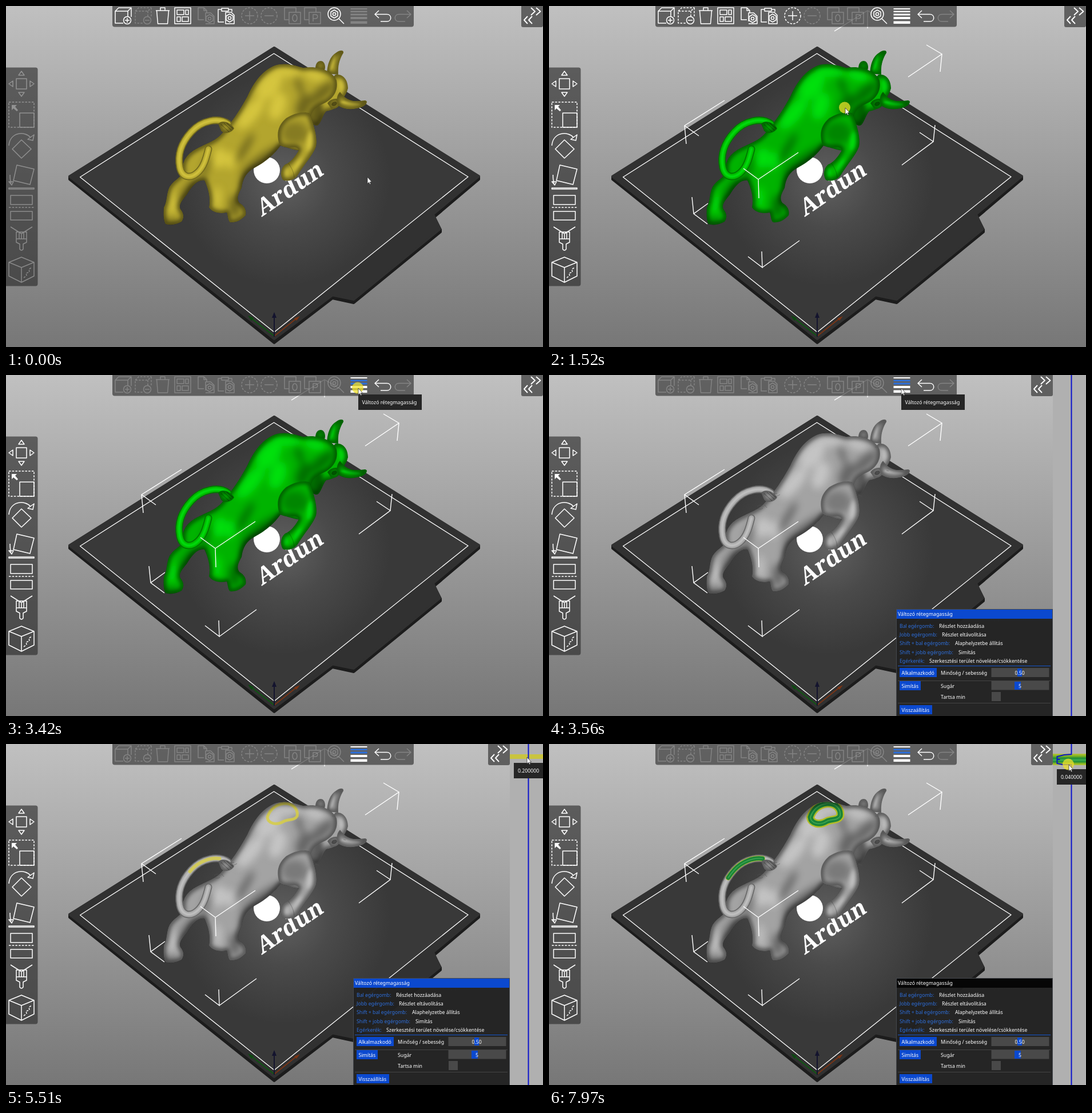
An HTML page for the animation above (8000 ms loop, 939 px wide and 596 px high).

```html
<!DOCTYPE html>
<html lang="hu">
<head>
<meta charset="utf-8">
<title>Változó rétegmagasság</title>
<style>
html, body { margin: 0; width: 100%; height: 100%; overflow: hidden; background: #999; }
svg { display: block; width: 100%; height: 100%; }
text { font: 8.72px "Noto Sans", sans-serif; fill: #fff; }
.icon { fill: none; stroke: #fff; stroke-width: 1.5; stroke-linejoin: round; }
.solid { fill: #fff; stroke: none; }
.dash { stroke-dasharray: 3.5 2.2; }
.bar { fill: #282828; fill-opacity: .62; }
.key { fill: #2e6fdc; }
.btn { fill: #0b49cf; }
.field { fill: #494949; }
.box { fill: none; stroke: #fff; stroke-width: 1.4; }
.tip { fill: #262626; }
.base { fill: var(--base); }
.hi { fill: var(--hi); }
.edge { fill: none; stroke: #000; stroke-opacity: .5; stroke-width: 9; filter: url(#soft); }
.tail { fill: none; stroke-linecap: round; }
</style>
</head>
<body>
<svg id="stage" viewBox="0 0 939 596">
  <defs>
    <linearGradient id="sky" x2="0" y2="1"><stop stop-color="#c0c0c0"/><stop offset="1" stop-color="#777"/></linearGradient>
    <radialGradient id="glow" gradientUnits="userSpaceOnUse" cx="487" cy="304" r="185">
      <stop stop-color="#606060"/><stop offset=".45" stop-color="#4a4a4a"/><stop offset="1" stop-color="#393939"/>
    </radialGradient>
    <linearGradient id="layers" x2="0" y2="1">
      <stop stop-color="#b9bf3a"/><stop offset=".2" stop-color="#7fb51f"/><stop offset=".4" stop-color="#1c8a38"/>
      <stop offset=".55" stop-color="#3fae52"/><stop offset=".7" stop-color="#1c8a38"/><stop offset=".85" stop-color="#86b81f"/><stop offset="1" stop-color="#b9bf3a"/>
    </linearGradient>
    <filter id="fine" x="-100%" y="-100%" width="300%" height="300%"><feGaussianBlur stdDeviation="1.8"/></filter>
    <filter id="soft" x="-30%" y="-30%" width="160%" height="160%"><feGaussianBlur stdDeviation="3.5"/></filter>
    <filter id="softer" x="-30%" y="-30%" width="160%" height="160%"><feGaussianBlur stdDeviation="7"/></filter>
  </defs>
  <rect width="939" height="596" fill="url(#sky)"/>

  <g id="bed" stroke-linejoin="round" stroke-width="4">
    <path d="M469 73L111 298V303L469 589L571 511L608 519L760 395V391L749 369L827 303V298Z" fill="#1c1c1c" stroke="#1c1c1c"/>
    <path d="M469 73L111 298L469 582L571 505.500L608 513L759 390L747 364L827 297.500Z" fill="#313131" stroke="#313131"/>
    <path d="M468.500 83L129.500 299L469 570L808 298.500Z" fill="url(#glow)" stroke="#fff" stroke-width="1.3"/>
    <circle cx="456" cy="287" r="23" fill="#fff"/>
    <text transform="matrix(.825 -.565 .4 .9 447 369)" style="font:bold 41px 'Noto Serif',serif">Ardun</text>
    <g fill="none" stroke-width="1.6">
      <path d="M469 577L428 545" stroke="#0c5a10"/><path d="M469 577L508 546" stroke="#7d3413"/>
      <path d="M469 578V542" stroke="#14142e" stroke-width="2"/>
    </g>
    <path d="M423 541L433 545L429 550Z" fill="#0c4a10"/><path d="M514 542L504 546L508 550Z" fill="#7d3413"/>
    <path d="M469 535L465 545H473Z" fill="#14142e"/>
  </g>

  <path id="boxBack" class="box" d="M307 165L237 209L240 241M237 209L262 227M250 334L253 363L277 381M253 363L278 345M372 429L373 457L348 438M373 457L438 410M628 124L687 84L660 68M687 84L684 115M675 208L672 237L617 278M672 237L648 221M499 44L557 8L582 23M557 8V39"/>
  <g id="bull"></g>
  <path id="boxFront" class="box" d="M436 256L366 303L340 284M366 303L367 336"/>

  <g id="editor">
    <rect x="881" width="58" height="596" fill="#b0b0b0"/>
    <rect id="band" x="881" width="58"/>
    <path id="profile" fill="none" stroke="#0b12cc" stroke-width="2"/>
    <g id="panel"></g>
  </g>
  <rect class="bar" x="186" y="-5" width="527" height="41.500" rx="4"/>
  <rect class="bar" x="-5" y="107.500" width="60.500" height="382" rx="4"/>
  <g id="tools"></g>
  <g id="fold">
    <rect class="bar" x="901" y="-5" width="38" height="42" rx="3"/>
    <path class="icon" style="stroke-width:1.9" d="M918 3L925 9.500L918 16M927 3L934.500 9.500L927 16M912 18L906 24.500L912 31M920 18L914 24.500L920 31"/>
  </g>
  <g id="hint">
    <rect class="tip" x="616" y="34" width="111" height="27"/>
    <text x="622.500" y="51">Változó rétegmagasság</text>
  </g>
  <g id="value">
    <rect class="tip" x="888" width="51" height="27"/>
    <text id="height" x="913.500" y="16.500" text-anchor="middle"></text>
  </g>
  <g id="cursor">
    <circle id="press" cx="-1" cy="-.5" r="10" fill="#eee02c" opacity=".75"/>
    <path d="M0 0V11.500L2.600 9.200L4.400 13L6 12.300L4.400 8.600H7.700Z" fill="#fff" stroke="#222" stroke-width=".7"/>
  </g>
</svg>
<script>
const $ = id => document.getElementById(id);
const show = (id, on) => { $(id).style.display = on ? '' : 'none'; };

// Toolbar icons, drawn around their centre
const crate = 'M-14 -8L-8 -14H14L8 -8H-14V13H0M8 -8V1M14 -14V2';
const p = (d, cls = '') => `<path class="${cls}" d="${d}"/>`;
const ring = (x, y, r, cls = '') => `<circle class="${cls}" cx="${x}" cy="${y}" r="${r}"/>`;
const hexa = (x, y) => p(`M${x - 6} ${y - 3.5}l6 -3.500l6 3.500v7l-6 3.500l-6 -3.500z`) + ring(x, y, 2.6);
const sheets = p('M-6 7H-14V-14H6V-6M-6 -6H14V14H-6Z');
const arrow = 'M-7 -9L-14 -2.500L-7 4M-14 -2.500H7C16 -2.500 16 10 7 10H-4';

const topIcons = [
  [205, 'add', p(crate) + ring(7, 8, 6.5) + p('M3 8H11M7 4V12')],
  [240, 'sel', p(crate, 'dash') + ring(7, 8, 6.5) + p('M3 8H11')],
  [274, 'add', p('M-12 -9H12M-4 -9V-14H4V-9M-10.500 -9L-8.500 14H8.500L10.500 -9')],
  [309, 'add', p('M-14 -14H14V14H-14ZM-10 -10H2V-2H-10ZM5 -10H10V-2H5ZM-10 2H-4V10H-10ZM-1 2H10V10H-1Z')],
  [350, 'sel', p('M-4 7H-14V-14H-4L1 -9V-5M-4 -14V-9H1M-1 10V-5H8L14 1V14H-1') + hexa(6, 5)],
  [385, 'add', p('M-4 11H-14V-11H-8M4 -11H10V-7M-8 -13H4V-8H-8ZM-1 14V-6H9L14 -1V14Z') + hexa(6, 4)],
  [426, 'sel', ring(0, 0, 14, 'dash') + p('M-8 0H8M0 -8V8')],
  [460, 'off', ring(0, 0, 14, 'dash') + p('M-8 0H8')],
  [501, 'split', sheets + '<ellipse cx="4" cy="4" rx="4" ry="6"/>'],
  [536, 'split', sheets + p('M1 10V-2H5C10 -2 10 5 5 5H1')],
  [577, 'add', ring(-3, -3, 11) + hexa(-3, -3) + p('M5 5L14 14')],
  [617, 'layers', [[-13, 2], [-8.5, 2.5], [-3.5, 3], [2, 4], [9.5, 4.5]].map(([y, h], i) =>
    `<rect class="solid ${i == 1 || i == 2 ? 'thin' : ''}" x="-14.500" y="${y}" width="29" height="${h}"/>`).join('')],
  [659, 'undo', p(arrow)],
  [694, 'off', `<g transform="scale(-1 1)">${p(arrow)}</g>`]
];
const sideIcons = [
  [136, p('M-9 -9H9V9H-9ZM0 -22L-5 -15H5ZM0 22L-5 15H5ZM-22 0L-15 -5V5ZM22 0L15 -5V5Z')],
  [190, p('M-22 -22H22V22H-22Z', 'dash') + p('M-3 -3H22V22H-3Z') + p('M-17 -17H-8L-11 -14L-6 -8L-8 -6L-14 -11L-17 -8Z', 'solid')],
  [244, p('M0 -10L17 6L0 22L-16 6ZM-22 0C-20 -24 6 -26 16 -14M22 -19L20 -9L11 -11Z')],
  [297, p('M-8 -19L22 -12L15 15L-14 8ZM-20 -2C-20 4 -20 8 -18 13M-22 10L-17 16L-14 10ZM-22 21H22V23H-22Z')],
  [352, p('M-19 -21H19V-5H-19ZM-19 7H19V22H-19Z') + p('M-22 0H22', 'dash')],
  [407, p('M-19 -21L0 -9L19 -21M-9 -12H9V6L3 9V18Q0 22 -3 18V9L-9 6ZM-9 0H9M-4 -11V0M0 -8V0M4 -11V0')],
  [461, p('M0 -22L22 -13V11L0 22L-22 11V-13ZM-22 -13L0 -4L22 -13M0 -4V22') + p('M4 14L9 10L8 6L14 4L13 -1L18 -4', 'dash')]
];
$('tools').innerHTML =
  topIcons.map(([x, use, art]) => `<g class="icon" data-use="${use}" transform="translate(${x} 17)">${art}</g>`).join('') +
  sideIcons.map(([y, art]) => `<g class="icon" data-use="side" transform="translate(27 ${y})">${art}</g>`).join('');

// Panel
const label = (x, y, s, cls = '') => `<text class="${cls}" x="${x}" y="${y + 3.2}">${s}</text>`;
const rect = (x, y, w, h, cls) => `<rect class="${cls}" x="${x}" y="${y}" width="${w}" height="${h}"/>`;
const rule = (y, c) => `<path d="M610 ${y}H877" stroke="${c}"/>`;
const keys = [
  ['Bal egérgomb:', 682, 'Részlet hozzáadása'], ['Jobb egérgomb:', 687, 'Részlet eltávolítása'],
  ['Shift + bal egérgomb:', 710, 'Alaphelyzetbe állítás'], ['Shift + jobb egérgomb:', 716, 'Simítás'],
  ['Egérkerék:', 665, 'Szerkesztési terület növelése/csökkentése']
];
$('panel').innerHTML =
  '<rect x="607.500" y="409.500" width="273" height="190" fill="#222" fill-opacity=".96" stroke="#45484d"/>' +
  '<rect id="title" x="608" y="410" width="272" height="16"/>' + label(610, 418, 'Változó rétegmagasság') +
  keys.map(([k, x, s], i) => label(613, 438.3 + 15.4 * i, k, 'key') + label(x, 438.3 + 15.4 * i, s)).join('') +
  rule(508.5, '#1556cf') + rule(534.5, '#444') + rule(573.5, '#444') +
  rect(613, 512, 65, 16, 'btn') + label(616.5, 520.5, 'Alkalmazkodó') + label(685, 520.5, 'Minőség / sebesség') +
  rect(773.5, 512, 101, 16, 'field') + rect(819, 513, 8, 14, 'btn') + label(814.5, 520.5, '0.50') +
  rect(613, 535, 37, 16, 'btn') + label(616.5, 543.5, 'Simítás') + label(685, 543.5, 'Sugár') +
  rect(773.5, 535, 101, 15.5, 'field') + rect(814, 536, 11, 14, 'btn') + label(821, 543.5, '5') +
  label(685, 563, 'Tartsa min') + rect(774, 554, 16, 16, 'field') +
  rect(613, 577, 57, 16, 'btn') + label(616.5, 585.5, 'Visszaállítás');

// Bull: each part is a filled shape with a soft dark rim
let parts = 0;
const part = (d, inner = '') => {
  const id = 'part' + parts++;
  return `<clipPath id="${id}"><path d="${d}"/></clipPath><g clip-path="url(#${id})">` +
    `<path class="base" d="${d}"/>${inner}<path class="edge" d="${d}"/></g>`;
};
const blobs = (list, cls, op, blur = 'softer') => `<g class="${cls}" filter="url(#${blur})" opacity="${op}">` + list.map(([x, y, rx, ry, a]) =>
  `<ellipse rx="${rx}" ry="${ry}" transform="translate(${x} ${y}) rotate(${a})"/>`).join('') + '</g>';

const lit = blobs([[460, 140, 28, 17, -50], [428, 188, 34, 13, -50], [492, 116, 26, 8, 5], [374, 266, 12, 18, 10],
  [475, 175, 14, 25, 20], [394, 270, 8, 16, 10], [540, 122, 20, 8, 15], [370, 335, 6, 20, 0], [292, 345, 6, 20, 10]], 'hi', .95);
const dim = blobs([[452, 268, 50, 11, -34], [552, 152, 30, 10, -40], [520, 175, 12, 22, 20], [348, 285, 5, 26, 15],
  [400, 350, 10, 20, 0], [318, 322, 8, 26, 35], [418, 248, 30, 6, -60], [513, 140, 5, 18, -20], [420, 300, 8, 28, 20], [288, 378, 16, 6, 0]], '', .38);
const crown = 'M457 128C461 116 470 106 486 104C503 103 511 115 509 126C505 134 494 131 486 135C473 143 458 139 457 128Z';
const tailPath = 'M388 206C372 194 342 200 324 220C304 242 300 262 304 282C308 300 322 302 334 292C346 282 350 266 354 250';
const stroke = (d, w, c, more = '') => `<path d="${d}" class="tail" style="stroke:${c};stroke-width:${w}" ${more}/>`;

$('bull').innerHTML =
  part('M561 118C562 102 566 88 578 81C585 76 591 77 590 82C584 92 580 102 581 120Z', blobs([[571, 99, 3, 16, 15]], 'hi', .9, 'fine')) +
  part('M541 109C541 98 548 94 554 97C559 101 559 110 556 114Z') +
  part('M576 120C590 118 598 130 598 144C596 152 592 158 588 164C584 176 572 182 560 184C554 190 552 202 546 208C540 211 533 206 531 198C530 190 532 180 538 172C548 160 556 140 576 120Z',
    blobs([[588, 138, 6, 14, 0]], 'hi', .8, 'soft') + blobs([[545, 190, 9, 22, 10]], '', .45, 'soft')) +
  part('M470 104C488 98 505 104 520 108C545 104 570 112 578 130C582 150 570 165 552 172C538 178 535 184 531 196C540 215 544 230 542 244C528 262 500 250 480 244C470 258 455 272 436 282C420 290 414 302 412 318C404 332 404 338 408 344C418 350 421 358 419 366C410 376 400 379 392 378C388 376 388 366 386 361C372 364 360 360 355 352C358 336 354 320 347 305C335 303 325 315 316 330C306 342 302 348 305 355C311 362 312 370 307 377C298 382 288 384 279 381C275 374 275 362 276 352C282 342 280 328 286 316C294 303 304 302 310 290C306 270 318 258 332 250C350 240 368 236 380 220C400 196 410 180 422 158C432 136 446 114 470 104Z',
    lit + dim + '<g id="crown"></g>') +
  part('M531 188C540 212 545 232 542 246C536 262 522 276 510 296C505 304 492 308 484 304C479 296 480 284 488 277C496 274 504 266 512 252C512 247 505 246 495 247C488 247 482 246 478 242C472 222 476 208 490 196C503 188 520 183 531 188Z',
    blobs([[505, 222, 24, 20, 0]], '', .25) + blobs([[532, 236, 6, 18, 10], [489, 290, 4, 10, 0], [510, 278, 4, 14, 35]], 'hi', .9, 'soft')) +
  '<path d="M494 275C500 284 503 290 504 300" fill="none" stroke="#000" stroke-opacity=".25"/>' +
  part('M562 170C567 162 580 159 585 166C586 174 578 181 569 180Z') +
  '<ellipse cx="574" cy="171" rx="5" ry="3.500" fill="#000" opacity=".4" transform="rotate(-25 574 171)"/>' +
  part('M584 150C592 162 604 167 616 166C624 166 629 163 631 167C631 173 624 177 614 179C602 182 588 180 581 174C577 166 578 156 584 150Z', blobs([[602, 170, 18, 3, 8]], 'hi', .9, 'fine')) +
  stroke(tailPath, 13, 'var(--base)') + stroke(tailPath, 13, '#000', 'opacity=".36"') +
  stroke(tailPath, 9.5, 'var(--base)') + stroke(tailPath, 4, 'var(--hi)', 'filter="url(#fine)"') + '<g id="tailMark"></g>' +
  part('M371 206C378 198 392 203 399 214C394 222 382 225 376 218Z') +
  '<path d="M376 207L390 220M381 205L394 217M386 205L397 214" stroke="#000" stroke-opacity=".4"/>' +
  '<path id="specks" d="M364 230q5 -5 9 -1M366 234q5 2 8 -1M377 227l4 5M393 208l6 -1M396 213l8 -4M570 126h6M590 167l4 1M541 210l6 2" fill="none" stroke="#555" stroke-opacity=".55"/>';

// Pointer moves: start, end, steps, x, y, easing
const out = k => 1 - (1 - k) ** 2, into = k => k * k, even = k => k;
const moves = [
  [380, 790, 7, 528, 185, out], [980, 1130, 3, 518, 178, even], [2110, 2320, 4, 569, 99, out],
  [2460, 2940, 8, 616, 23, out], [4090, 4300, 4, 756, 73, out], [4490, 4640, 3, 851, 70, into],
  [4840, 5110, 5, 908, 60, even], [5180, 5510, 6, 911, 23, out], [7450, 7970, 8, 909, 36, even]
];
const stepped = (t, a, b, n) => t < a ? 0 : Math.min(n, Math.floor((t - a) / (b - a) * (n - 1) + .08) + 1) / n;
function pointer(t) {
  let x = 632, y = 299;
  for (const [a, b, n, tx, ty, ease] of moves) {
    const k = ease(stepped(t, a, b, n));
    x += (tx - x) * k;
    y += (ty - y) * k;
  }
  return [x, y];
}

const skins = { idle: ['#b3a52e', '#d8c83f'], hover: ['#3da311', '#55cf1d'], picked: ['#00b300', '#00e30a'], plain: ['#a3a3a3', '#c6c6c6'] };
const within = (t, a, b) => t >= a && t < b;
const mark = (d, widths, more) => ['#b4bd26', '#1b8438', '#46ad58'].map((c, i) => widths[i] ? stroke(d, widths[i], c, more) : '').join('');

function render(t) {
  const [x, y] = pointer(t);
  const picked = t >= 1450, active = t >= 3420, editing = t >= 3480, drag = t >= 7250, onBar = editing && x >= 881;
  const skin = skins[editing ? 'plain' : picked ? 'picked' : t >= 590 ? 'hover' : 'idle'];
  $('bull').style.setProperty('--base', skin[0]);
  $('bull').style.setProperty('--hi', skin[1]);
  show('specks', editing);
  show('boxBack', picked);
  show('boxFront', picked);
  show('editor', editing);
  show('hint', within(t, 3420, 4090));
  show('value', onBar);
  show('press', within(t, 1450, 1720) || within(t, 3360, 3560) || drag);
  $('cursor').setAttribute('transform', `translate(${x} ${y})`);
  $('fold').setAttribute('transform', `translate(${editing ? -58 : 0} 0)`);
  $('title').setAttribute('fill', drag ? '#060606' : '#0b49cf');

  const on = { add: !active, sel: picked && !active, split: t >= 1720 && !active, layers: picked, undo: true, off: false, side: picked };
  document.querySelectorAll('[data-use]').forEach(g => { g.style.opacity = on[g.dataset.use] ? 1 : g.dataset.use == 'side' ? .34 : .22; });
  document.querySelectorAll('.thin').forEach(r => { r.style.fill = t >= 2870 ? '#2b6fdb' : '#fff'; });

  // Layer height editing: depth grows while the button is held
  const depth = drag ? .2 + .1 * stepped(t, 7250, 7310, 2) + .7 * stepped(t, 7450, 7970, 8) : 0;
  const low = onBar && !drag ? y - 23 : 0;
  const dash = `pathLength="100" stroke-dasharray="${26 + 6 * depth} 200" stroke-dashoffset="${-7 - low * .25}"`;
  const yellow = '#d8ce45';
  $('crown').setAttribute('transform', `translate(485 ${118 + low * .25}) scale(${1 + low * .012}) translate(-485 -118)`);
  $('crown').innerHTML = !onBar ? '' : drag
    ? mark(crown, [5 + 9 * depth, 1 + 8 * depth, depth > .6 ? 1.3 : 0])
    : stroke(crown, 5, yellow, 'opacity=".85"');
  $('tailMark').innerHTML = !onBar ? '' : drag
    ? mark(tailPath, [9, 3 + 4.5 * depth, depth > .6 ? 1.2 : 0], dash)
    : stroke(tailPath, 6, yellow, dash + ' opacity=".8"');

  const mid = drag ? 22 + 5 * depth : y - 1, h = drag ? 9 + 11 * depth : 8;
  const band = $('band');
  band.setAttribute('y', mid - h / 2);
  band.setAttribute('height', h);
  band.setAttribute('fill', drag ? 'url(#layers)' : '#c9c43f');
  show('band', onBar);
  const left = 913.5 - 25 * depth, a = mid - h * .4, b = mid + h * .45;
  $('profile').setAttribute('d', drag
    ? `M913.500 0V${a - 1}L${left + 12 * depth} ${a}L${left} ${a + 3}V${mid}h${5 * depth}M${left} ${mid}V${b - 2}L${left + 10 * depth} ${b}H913.500V596`
    : 'M913.500 0V596');
  $('value').setAttribute('transform', `translate(0 ${y + 10 - 2 * depth})`);
  $('height').textContent = (.2 - .16 * depth).toFixed(6);
}

function frame(now) {
  render(now % 8000);
  requestAnimationFrame(frame);
}
render(0);
requestAnimationFrame(frame);
</script>
</body>
</html>
```
